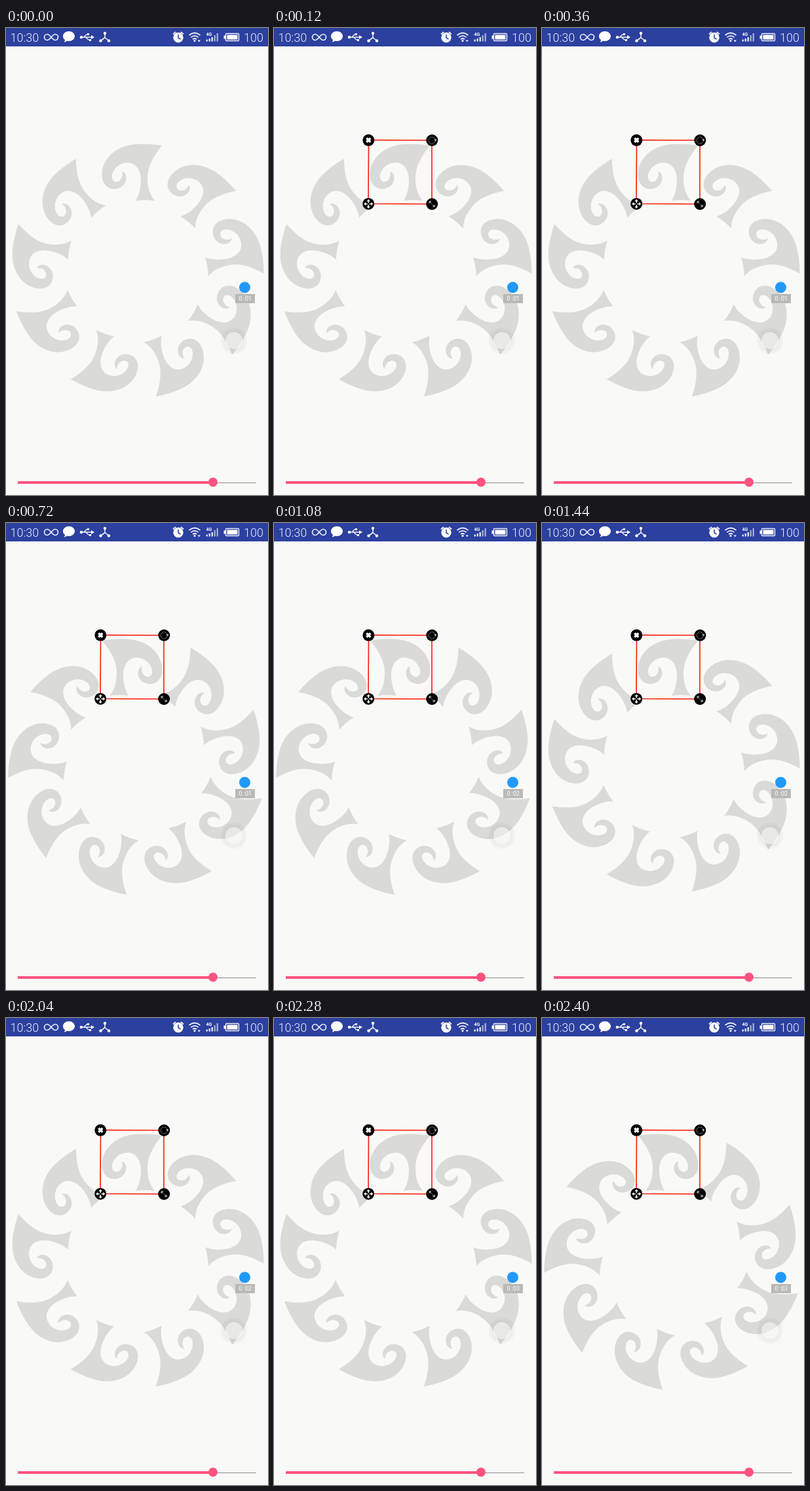
Write an HTML page that moves like this. It is 400 px wide and 711 px high and loops after 2880 ms.

```html
<!DOCTYPE html>
<html lang="en">
<head>
<meta charset="utf-8">
<title>Ring editor</title>
<style>
  html, body { margin: 0; width: 100%; height: 100%; overflow: hidden; background: #f9f9f7; }
  svg { display: block; width: 100vw; height: 100vh; font-family: Roboto, "Open Sans", sans-serif; }
  .line { fill: none; stroke: #eef0fa; }
  .icon { fill: #fff; }
</style>
</head>
<body>
<svg viewBox="0 0 400 711">
  <defs>
    <path id="motif" d="M238 179C226 177 210 175.5 196 177C170 179.500 147.500 197 146.500 222C146 236 154 245 165 245C176 245 184 237 183.500 227C183 222 180 219 177 218C179 224 177 232 170 234C164 235 161 230 162 224C164 213 175 204 187 205C200 206 206 218 206 232C206 244 203 255 198 263Q212 261 227 263C218 252 216 240 216 228C216 210 226 194 238 179Z"/>
  </defs>

  <rect width="400" height="711" fill="#f9f9f7"/>
  <g id="ring" fill="#dadad8"></g>

  <!-- selection box -->
  <g id="box">
    <path d="M144.500 170.500L241 171V268L144 267.500Z" fill="none" stroke="#fb1a0c" stroke-width="1.600"/>
    <g transform="translate(144.300 170.800)">
      <circle r="9"/>
      <path d="M-3 -3L3 3M3 -3L-3 3" stroke="#fff" stroke-width="3.400"/>
    </g>
    <g transform="translate(241.300 171)">
      <circle r="9"/>
      <circle r="5" fill="none" stroke="#ccc" stroke-width=".9" stroke-dasharray="1.500 1"/>
      <path d="M3 -1.500L7 -1.500L5.500 1.500Z" fill="#ccc"/>
    </g>
    <g transform="translate(144.200 267.700)">
      <circle r="9"/>
      <g id="arrows" fill="#fff"></g>
    </g>
    <g transform="translate(241.200 268)">
      <circle r="9"/>
      <path d="M-4 -1V-4H-1M-4 -4L-.8 -.8M4 1V4H1M4 4L.8 .8" fill="none" stroke="#ddd"/>
    </g>
  </g>

  <!-- floating buttons -->
  <circle cx="348" cy="476" r="20" fill="#000" fill-opacity=".03"/>
  <circle cx="348" cy="476" r="16.500" fill="#000" fill-opacity=".015"/>
  <circle cx="348" cy="476" r="13" fill="#fff" fill-opacity=".5"/>
  <circle cx="364.500" cy="395" r="8.500" fill="#2299f8"/>
  <rect x="350" y="405" width="30" height="14" fill="#b9b9b8"/>
  <text id="clock" x="355.500" y="415.300" font-size="9" fill="#fff" xml:space="preserve">0 :01</text>

  <!-- slider -->
  <path d="M316 692.500H382" stroke="#8b8b8b"/>
  <path d="M18 692H316" stroke="#ff527f" stroke-width="4"/>
  <circle cx="316" cy="691.500" r="6.900" fill="#ff527f"/>

  <!-- status bar -->
  <rect width="400" height="28" fill="#2c409f"/>
  <g font-size="18" font-weight="300" fill="#eef0fa">
    <text x="6.500" y="21">10:30</text>
    <text x="363" y="21">100</text>
  </g>
  <path class="line" stroke-width="1.700" d="M69 14C66 10.500 64.500 9.500 63 9.500A4.500 4.500 0 0 0 63 18.500C67.500 18.500 70.500 9.500 75 9.500A4.500 4.500 0 0 1 75 18.500C73.500 18.500 72 17.500 69 14Z"/>
  <path class="icon" d="M96 5C101 5 105 8.500 105 12.500S101 20 96 20Q94.500 20 93 19.500Q91 21.500 88.500 21.500Q90 20 90 18Q87 16 87 12.500C87 8.500 91 5 96 5Z"/>
  <path class="line" stroke-width="1.500" d="M115 14H131M118 14C121 14 120.500 9.500 125 9.500M121 14C124 14 123.500 18.500 128 18.500"/>
  <path class="icon" d="M130 11L135 14L130 17ZM124 8H127V11H124ZM127 17H130V20H127Z"/>
  <circle class="icon" cx="115" cy="14" r="2.300"/>
  <path class="line" stroke-width="1.600" d="M151 8V14.500L144.500 19.500M151 14.500L157 19.500"/>
  <g class="icon">
    <circle cx="151" cy="8" r="2.200"/>
    <circle cx="144.500" cy="19.500" r="2.200"/>
    <circle cx="157" cy="19.500" r="2.200"/>
  </g>
  <circle class="icon" cx="263" cy="14.500" r="7.700"/>
  <path class="line" stroke-width="1.800" d="M255 9.500L259 6M267 6L271 9.500"/>
  <path d="M263 10V15L266.500 17" fill="none" stroke="#2c409f" stroke-width="1.500"/>
  <path class="line" stroke-width="1.700" d="M279.500 11Q288 4 296.500 11M282.300 14.200Q288 9.500 293.700 14.200M285 17.200Q288 14.800 291 17.200"/>
  <circle class="icon" cx="288" cy="19.500" r="1.500"/>
  <path class="icon" d="M292.500 18.500H297L294.750 21.200Z"/>
  <text class="icon" x="305.500" y="12" font-size="7" font-weight="700">4G</text>
  <path class="line" stroke-width="2.200" d="M306.700 20.500V17.500M310.700 20.500V16M314.700 20.500V14"/>
  <path class="line" stroke-width="2.200" stroke-opacity=".65" d="M318.700 20.500V11M322.700 20.500V8"/>
  <rect class="line" x="335.500" y="8.500" width="20" height="11" rx="1" stroke-width="1.400"/>
  <path class="icon" d="M337.500 10.500H353.500V17.500H337.500ZM332.500 11.500H335V16.500H332.500Z"/>
</svg>
<script>
  const LOOP = 2880, COUNT = 9;
  const find = id => document.getElementById(id);
  const turns = (n, make) => Array.from({ length: n }, (_, i) => make(i * 360 / n)).join("");

  find("ring").innerHTML = turns(COUNT, a =>
    `<use href="#motif" transform="rotate(${a} 199.700 369.200)"/>`);
  find("arrows").innerHTML = turns(4, a =>
    `<path transform="rotate(${a})" d="M0 -7L2.800 -4H.8V-1.500H-.8V-4H-2.800Z"/>`);

  function draw(now) {
    const t = now % LOOP;
    const flipped = t >= 720 && t < 1440 || t >= 2400;
    const seconds = t < 1080 ? 1 : t < 2280 ? 2 : 3;
    find("box").setAttribute("visibility", t < 120 ? "hidden" : "visible");
    // each motif is mirrored about its own middle, so the ring turns the other way
    find("motif").setAttribute("transform", flipped ? "translate(385 0) scale(-1 1)" : "");
    find("clock").textContent = "0 :0" + seconds;
    requestAnimationFrame(draw);
  }
  draw(performance.now());
</script>
</body>
</html>
```
